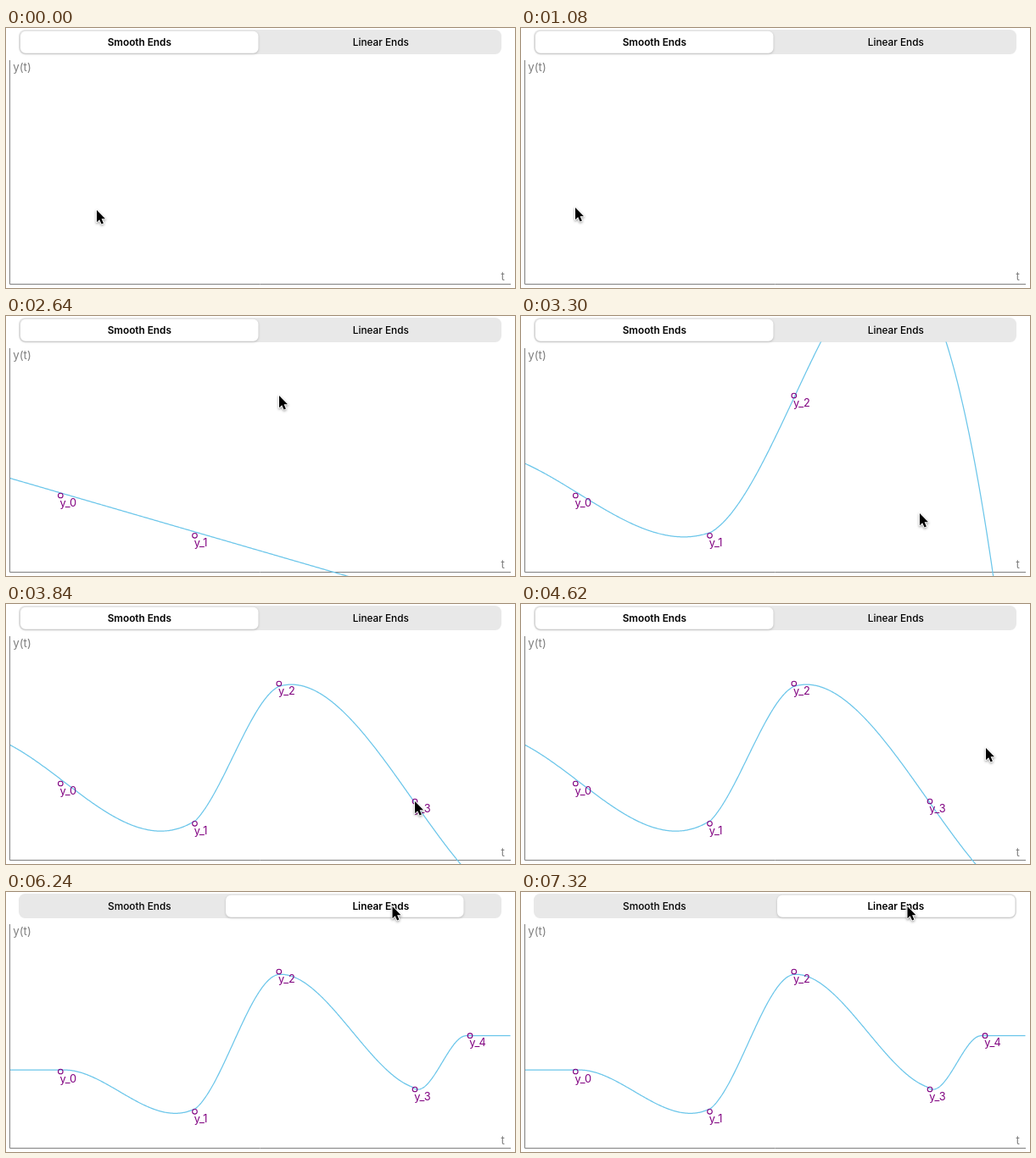
Recreate the animation shown at these times as an HTML page with a canvas. Size 600 by 307 pixels, loop 7.56 s.

```html
<!DOCTYPE html>
<html lang="en">
<head>
<meta charset="utf-8">
<title>Spline ends</title>
<style>
  html, body { margin: 0; width: 100%; height: 100%; overflow: hidden; background: #fff; }
  canvas { display: block; width: 600px; height: 307px; }
</style>
</head>
<body>
<canvas id="stage"></canvas>
<script>
const W = 600, H = 307, LOOP = 7560, TICK = 60;
const SWITCH = 6060;
const FONT = 'Inter, "Open Sans", sans-serif';
const canvas = document.getElementById('stage');
const ctx = canvas.getContext('2d');
const ratio = window.devicePixelRatio || 1;
canvas.width = W * ratio;
canvas.height = H * ratio;

// Clicked points: x, y, time of the click
const points = [
  [64.3, 212, 1560], [222.5, 259.3, 2160], [321.8, 94, 2760],
  [482, 233, 3600], [547, 169.7, 4800]
];

// Pointer stops: time, x, y
const stops = [
  [0, 107, 215], [360, 88, 221], [840, 64, 212], [1560, 64, 212],
  [1920, 201, 255], [2040, 222, 259], [2220, 222, 259], [2640, 322, 94],
  [2820, 322, 94], [3300, 470, 233], [3420, 482, 233], [3900, 482, 233],
  [4560, 548, 170], [4860, 548, 170], [5160, 588, 95], [5640, 455, 42],
  [5880, 455.5, 17], [LOOP, 455.5, 17]
];

const smooth = u => u * u * (3 - 2 * u);

function pointerAt(t) {
  const i = stops.findIndex(s => s[0] > t);
  const [t0, x0, y0] = stops[i - 1], [t1, x1, y1] = stops[i];
  const u = smooth((t - t0) / (t1 - t0));
  return [x0 + (x1 - x0) * u, y0 + (y1 - y0) * u];
}

// The curve is plotted slightly smaller than the click area
const toKnot = ([x, y]) => [299.5 + (x - 299.5) * 0.982, 169.6 + (y - 169.6) * 0.955];

// Derivatives per knot of a uniform cubic spline, natural or flat at the ends
function tangents(ys, flat) {
  const last = ys.length - 1;
  const d = ys.map(() => 0);
  for (let pass = 0; pass < 40; pass++) {
    for (let i = 0; i <= last; i++) {
      if (i > 0 && i < last) d[i] = (3 * (ys[i + 1] - ys[i - 1]) - d[i - 1] - d[i + 1]) / 4;
      else if (!flat) {
        const j = i ? last - 1 : 1;
        const rise = i ? ys[last] - ys[j] : ys[1] - ys[0];
        d[i] = (3 * rise - d[j]) / 2;
      }
    }
  }
  return d;
}

function makeSpline(knots, flat) {
  const n = knots.length;
  if (n === 1) return () => knots[0][1];
  const ys = knots.map(k => k[1]);
  const d = tangents(ys, flat);
  return x => {
    if (flat && x <= knots[0][0]) return ys[0];
    if (flat && x >= knots[n - 1][0]) return ys[n - 1];
    let i = 0;
    while (i < n - 2 && x > knots[i + 1][0]) i++;
    const s = (x - knots[i][0]) / (knots[i + 1][0] - knots[i][0]);
    const rise = ys[i + 1] - ys[i];
    const b = 3 * rise - 2 * d[i] - d[i + 1];
    const c = d[i] + d[i + 1] - 2 * rise;
    return ys[i] + s * (d[i] + s * (b + s * c));
  };
}

function text(str, x, y, size, color, weight = 400, align = 'left') {
  ctx.font = `${weight} ${size}px ${FONT}`;
  ctx.fillStyle = color;
  ctx.textAlign = align;
  ctx.fillText(str, x, y);
}

function roundBox(x, y, w, h, r, color) {
  ctx.beginPath();
  ctx.roundRect(x, y, w, h, r);
  ctx.fillStyle = color;
  ctx.fill();
}

function shadow(color, blur, dy) {
  ctx.shadowColor = color;
  ctx.shadowBlur = blur * ratio;
  ctx.shadowOffsetY = dy * ratio;
}

function drawSwitch(t) {
  const linear = t >= SWITCH;
  const w = Math.max(0, t - SWITCH) * 0.0187;
  const slide = 1 - (1 + w) * Math.exp(-w);
  roundBox(15, 2, 569, 29, 7.5, '#e8e8e8');
  ctx.save();
  shadow('rgba(0,0,0,.2)', 3, 1);
  roundBox(17 + 285 * slide, 3.8, 280.5, 26, 6, '#fff');
  ctx.restore();
  text('Smooth Ends', 157.3, 21.2, 11.8, '#000', linear ? 500 : 600, 'center');
  text('Linear Ends', 441.8, 21.2, 11.8, '#000', linear ? 600 : 500, 'center');
}

function drawAxes() {
  ctx.strokeStyle = '#808080';
  ctx.lineWidth = 1;
  ctx.beginPath();
  ctx.moveTo(4.5, 38);
  ctx.lineTo(4.5, 302.5);
  ctx.lineTo(595, 302.5);
  ctx.stroke();
  text('y(t)', 8.3, 51.3, 13.3, '#808080');
  text('t', 583.5, 297.5, 13.3, '#808080');
}

function drawCurve(clicked, flat) {
  const f = makeSpline(clicked.map(toKnot), flat);
  ctx.save();
  ctx.beginPath();
  ctx.rect(5, 30.5, 589.5, 277);
  ctx.clip();
  ctx.beginPath();
  for (let x = 4; x <= 596; x++) ctx.lineTo(x, f(x));
  ctx.strokeStyle = '#6cc6ea';
  ctx.lineWidth = 1.25;
  ctx.stroke();
  ctx.restore();
}

function drawPoint([x, y], i) {
  ctx.beginPath();
  ctx.arc(x, y, 2.8, 0, 2 * Math.PI);
  ctx.strokeStyle = '#800080';
  ctx.lineWidth = 1.1;
  ctx.stroke();
  text('y_' + i, x - 0.8, y + 12.6, 12.8, '#800080');
}

const arrow = new Path2D('M0 0V14.2L3.2 11.2L5.6 16.4L7.9 15.4L5.6 10.3H10Z');

function drawPointer([x, y]) {
  ctx.save();
  ctx.translate(x, y);
  ctx.lineJoin = 'round';
  ctx.lineWidth = 1.8;
  ctx.strokeStyle = '#fff';
  shadow('rgba(0,0,0,.4)', 3, 1.3);
  ctx.stroke(arrow);
  shadow('transparent', 0, 0);
  ctx.fillStyle = '#000';
  ctx.fill(arrow);
  ctx.restore();
}

function draw(t) {
  ctx.setTransform(ratio, 0, 0, ratio, 0, 0);
  ctx.fillStyle = '#fff';
  ctx.fillRect(0, 0, W, H);
  drawSwitch(t);
  drawAxes();
  const clicked = points.filter(p => t >= p[2]);
  if (clicked.length) drawCurve(clicked, t >= SWITCH);
  clicked.forEach(drawPoint);
  drawPointer(pointerAt(t));
}

const start = performance.now();
function frame() {
  const t = (performance.now() - start) % LOOP;
  draw(Math.floor(t / TICK) * TICK);
  requestAnimationFrame(frame);
}
frame();
</script>
</body>
</html>
```
